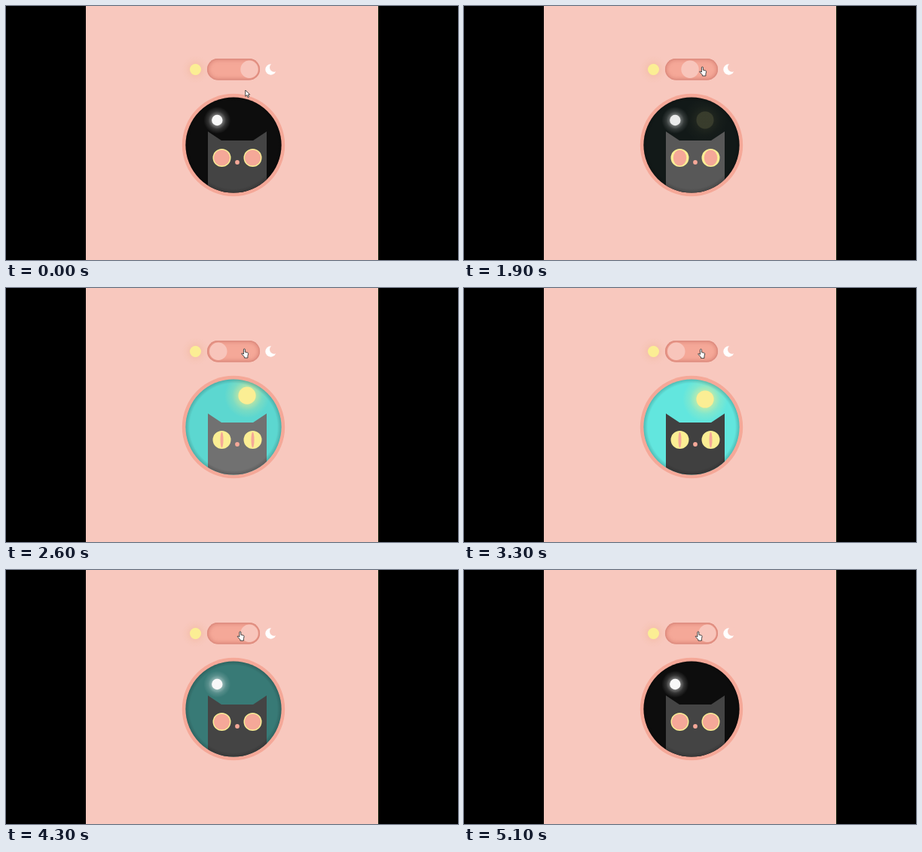
Recreate the animation shown at these times as an HTML page with a canvas. Size 600 px wide and 338 px high, loop 5.2 s.

```html
<!DOCTYPE html>
<html lang="en">
<head>
<meta charset="utf-8">
<title>Day and night cat</title>
<style>
  html, body { margin: 0; width: 100%; height: 100%; overflow: hidden; background: #000; }
  canvas { display: block; }
</style>
</head>
<body>
<canvas id="stage" width="600" height="338"></canvas>
<script>
const ctx = document.getElementById('stage').getContext('2d');
const LOOP = 5200, STEP = 100;
const DAY_AT = 1760, NIGHT_AT = 3800;
const PINK = '#f8c8be', CORAL = '#f5a898', YELLOW = '#fbee94';

const mix = (a, b, p) => a + (b - a) * p;
const ramp = (t, start, length) => Math.min(1, Math.max(0, (t - start) / length));
const ease = p => p * p * (3 - 2 * p);
const gray = v => `rgb(${v},${v},${v})`;

// 0 at night, 1 by day
const daylight = (t, length, delay = 0) =>
  ease(ramp(t, DAY_AT + delay, length)) - ease(ramp(t, NIGHT_AT + delay, length));

function ellipse(x, y, rx, ry, fill) {
  ctx.beginPath();
  ctx.ellipse(x, y, rx, ry, 0, 0, Math.PI * 2);
  ctx.fillStyle = fill;
  ctx.fill();
}
const disc = (x, y, r, fill) => ellipse(x, y, r, r, fill);

function glow(x, y, inner, outer, rgb, alpha) {
  const g = ctx.createRadialGradient(x, y, inner, x, y, outer);
  g.addColorStop(0, `rgba(${rgb},${alpha})`);
  g.addColorStop(0.5, `rgba(${rgb},${alpha * 0.3})`);
  g.addColorStop(1, `rgba(${rgb},0)`);
  disc(x, y, outer, g);
}

function polygon(points, fill) {
  ctx.beginPath();
  points.forEach(([x, y]) => ctx.lineTo(x, y));
  ctx.closePath();
  ctx.fillStyle = fill;
  ctx.fill();
}

function drawSwitch(t) {
  glow(251.5, 84.5, 7, 19, '238,176,140', 0.3);
  disc(251.5, 84.5, 7.5, YELLOW);

  ctx.save();
  ctx.beginPath();
  ctx.roundRect(267, 70, 70, 28.5, 14.25);
  ctx.fillStyle = CORAL;
  ctx.fill();
  ctx.clip();
  ctx.strokeStyle = '#df8e81';
  ctx.shadowColor = 'rgba(190,95,85,.6)';
  ctx.shadowBlur = 5;
  ctx.lineWidth = 3;
  ctx.stroke();
  ctx.restore();
  disc(mix(323, 281.8, daylight(t, 260)), 84.3, 11.7, '#f8c5bb');

  disc(351.5, 84.5, 7.2, '#fff');
  disc(356, 81.8, 6, PINK);
}

function drawEye(x, slit) {
  disc(x, 202, 12, YELLOW);
  ellipse(x, 202, mix(10.6, 2, slit), 10.6, CORAL);
}

function drawCat(t) {
  const flash = Math.sin(Math.PI * ramp(t, DAY_AT, 1200));
  const fur = gray(Math.round(mix(68, 64, daylight(t, 300)) + 60 * flash));
  polygon([[268, 167], [286, 179], [328, 179], [346, 167], [346, 250], [268, 250]], fur);
  const slit = daylight(t, 300, 50);
  drawEye(286.5, slit);
  drawEye(327.5, slit);
  disc(307, 208, 2.9, CORAL);
}

function drawSky(t) {
  const light = daylight(t, 1000);
  const rgb = [[13, 98], [13, 230], [13, 222]].map(([n, d]) => Math.round(mix(n, d, light)));
  disc(302, 185, 66, `rgb(${rgb})`);

  const sun = daylight(t, 200, 100);
  ctx.globalAlpha = 1 - sun;
  glow(280.3, 152, 6, 18, '255,255,255', 0.5);
  disc(280.3, 152, 7.2, '#f8f8f8');

  const rise = ease(ramp(t, DAY_AT, 1000)) - ease(ramp(t, DAY_AT + 1000, 1000));
  const sunY = 152.3 - 9.8 * rise;
  ctx.globalAlpha = sun;
  glow(320, sunY, 10, 30, '250,238,140', 0.6);
  disc(320, sunY, 11.6, YELLOW);
  ctx.globalAlpha = 1;
}

function drawWindow(t) {
  disc(302, 185, 68.2, CORAL);
  ctx.save();
  ctx.beginPath();
  ctx.arc(302, 185, 63.6, 0, Math.PI * 2);
  ctx.clip();
  drawSky(t);
  drawCat(t);
  const rim = ctx.createRadialGradient(302, 185, 58, 302, 185, 64);
  rim.addColorStop(0, 'rgba(0,0,0,0)');
  rim.addColorStop(1, 'rgba(0,0,0,.2)');
  disc(302, 185, 64, rim);
  ctx.restore();
}

const ARROW = new Path2D('M0 0V8.2L1.9 6.5 3.3 9.6 4.7 9 3.4 6H6Z');
const HAND = new Path2D('M3 7V1Q3 0 4 0T5 1V4.2L8.2 5Q9.3 5.3 9.2 6.5L8.5 9.5V12H4V10.5L.4 7Q0 5.8 1.2 6Z');

function drawCursor(t) {
  const arrive = ease(ramp(t, 0, 600));
  const shift = ease(ramp(t, 3100, 500));
  const x = mix(317.8, 316, arrive) - 5.5 * shift;
  const y = mix(112, 81, arrive) + shift;
  const hand = y < 98;
  const shape = hand ? HAND : ARROW;
  ctx.save();
  ctx.translate(hand ? x - 3.6 : x, y);
  ctx.fillStyle = '#fff';
  ctx.strokeStyle = '#333';
  ctx.lineWidth = 0.9;
  ctx.fill(shape);
  ctx.stroke(shape);
  ctx.restore();
}

function draw(now) {
  const t = Math.floor((now % LOOP) / STEP) * STEP;
  ctx.fillStyle = '#000';
  ctx.fillRect(0, 0, 600, 338);
  ctx.fillStyle = PINK;
  ctx.fillRect(106, 0, 388, 338);
  ctx.fillStyle = '#14240f';
  ctx.fillRect(494, 0, 1, 338);
  drawSwitch(t);
  drawWindow(t);
  drawCursor(t);
}

const start = performance.now();
function tick() {
  draw(performance.now() - start);
  requestAnimationFrame(tick);
}
tick();
</script>
</body>
</html>
```
